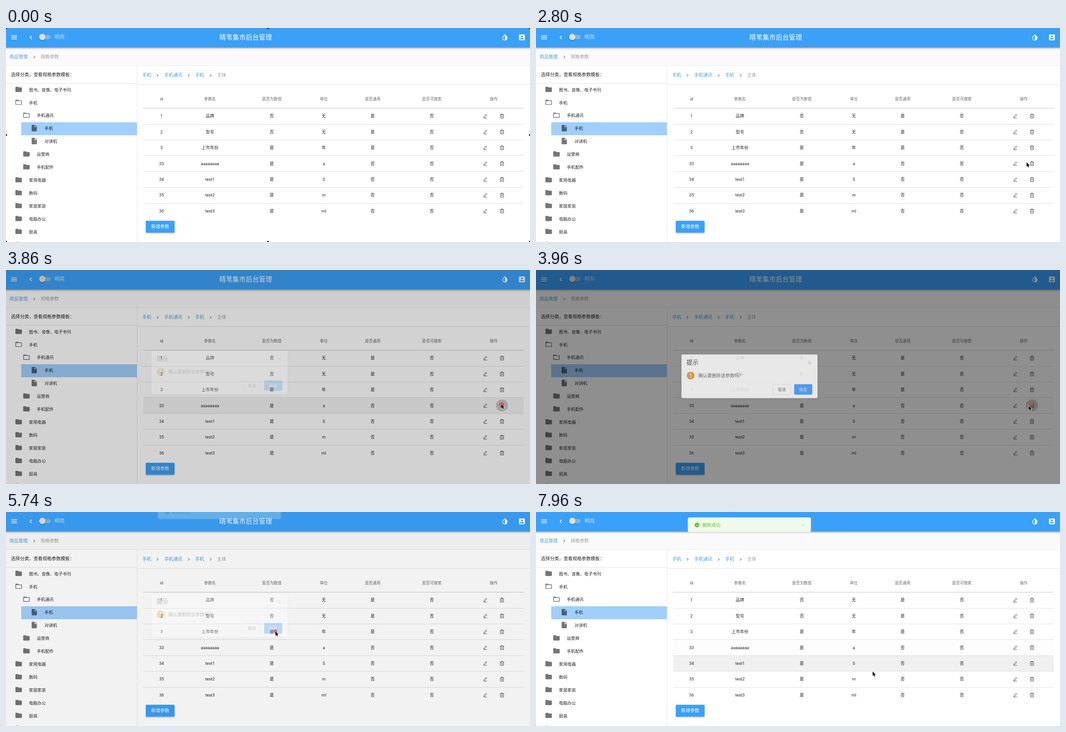
Recreate the animation shown at these times as an HTML page with a canvas. Size 1169 px wide and 479 px high, loop 8000 ms.

```html
<!DOCTYPE html>
<html lang="zh-CN">
<head>
<meta charset="utf-8">
<style>
html, body { margin: 0; width: 100%; height: 100%; overflow: hidden; background: #fff; }
canvas { display: block; width: 1169px; height: 479px; }
</style>
</head>
<body>
<canvas id="stage"></canvas>
<script>
const W = 1169, H = 479, LOOP = 8000, TAU = Math.PI * 2;
const dpr = window.devicePixelRatio || 1;

function setup(canvas) {
  canvas.width = Math.round(W * dpr);
  canvas.height = Math.round(H * dpr);
  const c = canvas.getContext('2d');
  c.scale(dpr, dpr);
  return c;
}
const screen2d = setup(document.getElementById('stage'));
const layer2d = setup(document.createElement('canvas'));
let ctx = screen2d;

// The interface is laid out at this zoom level.
const ZOOM = 0.722;
const BLUE = '#3ba0f8', LINK = '#4a9fe0', GREY = '#757575', DARK = 'rgba(0,0,0,.87)';
const FONT = 'Roboto, "Noto Sans CJK SC", "Noto Sans CJK", sans-serif';

const ICONS = {
  folder: 'M10 4H4c-1.1 0-1.99.9-1.99 2L2 18c0 1.1.9 2 2 2h16c1.1 0 2-.9 2-2V8c0-1.1-.9-2-2-2h-8l-2-2z',
  open: 'M20 6h-8l-2-2H4c-1.1 0-1.99.9-1.99 2L2 18c0 1.1.9 2 2 2h16c1.1 0 2-.9 2-2V8c0-1.1-.9-2-2-2zm0 12H4V8h16v10z',
  file: 'M6 2c-1.1 0-1.99.9-1.99 2L4 20c0 1.1.89 2 1.99 2H18c1.1 0 2-.9 2-2V8l-6-6H6zm7 7V3.5L18.5 9H13z',
  menu: 'M3 18h18v-2H3v2zm0-5h18v-2H3v2zm0-7v2h18V6H3z',
  left: 'M15.41 7.41L14 6l-6 6 6 6 1.41-1.41L10.83 12z',
  right: 'M10 6L8.59 7.41 13.17 12l-4.58 4.59L10 18l6-6z',
  invert: 'M17.66 7.93L12 2.27 6.34 7.93c-3.12 3.12-3.12 8.19 0 11.31C7.9 20.8 9.95 21.58 12 21.58c2.05 0 4.1-.78 5.66-2.34 3.12-3.12 3.12-8.19 0-11.31zM12 19.59c-1.6 0-3.11-.62-4.24-1.76C6.62 16.69 6 15.19 6 13.59s.62-3.11 1.76-4.24L12 5.1v14.49z',
  account: 'M3 5v14c0 1.1.89 2 2 2h14c1.1 0 2-.9 2-2V5c0-1.1-.9-2-2-2H5c-1.11 0-2 .9-2 2zm12 4c0 1.66-1.34 3-3 3s-3-1.34-3-3 1.34-3 3-3 3 1.34 3 3zm-9 8c0-2 4-3.1 6-3.1s6 1.1 6 3.1v1H6v-1z'
};
for (const k in ICONS) ICONS[k] = new Path2D(ICONS[k]);

const PEN = new Path2D('M-3.2 3.2L-2.6 .8L2 -4.2L3.8 -2.6L-.8 2.5ZM-3.6 4.5H4.2');
const TRASH = new Path2D('M-4.5 -3H4.5M-1.6 -3V-4.6H1.6V-3M-3.5 -3V4.6H3.5V-3M-1.2 -.8V2.6M1.2 -.8V2.6');
const ARROW = new Path2D('M0 0V9.8L2.2 7.8L3.8 11.5L5.5 10.8L3.9 7.2H7Z');
const HAND = new Path2D('M-1.9 .4Q-.9 -.6 0 .4V4.4L3.8 5.2Q5 5.6 4.9 7L4.2 10.8H-1.6L-4.6 6.6Q-4.6 5.2 -3.4 5.5L-1.9 6.8Z');

const TREE = [
  ['folder', 0, '图书、音像、电子书刊'], ['open', 0, '手机'], ['open', 1, '手机通讯'],
  ['file', 2, '手机'], ['file', 2, '对讲机'], ['folder', 1, '运营商'], ['folder', 1, '手机配件'],
  ['folder', 0, '家用电器'], ['folder', 0, '数码'], ['folder', 0, '家居家装'],
  ['folder', 0, '电脑办公'], ['folder', 0, '厨具'], ['folder', 0, '']
];
const COLS = [347, 455, 593, 709, 818, 950, 1088];
const HEAD = ['id', '参数名', '是否为数值', '单位', '是否通用', '是否可搜索', '操作'];
const ROWS = [
  ['1', '品牌', '否', '无', '是', '否'], ['2', '型号', '否', '无', '是', '否'],
  ['3', '上市年份', '是', '年', '是', '否'], ['33', 'aaaaaaaa', '是', 'a', '否', '否'],
  ['34', 'test1', '是', 'S', '否', '否'], ['35', 'test2', '是', 'm', '否', '否'],
  ['36', 'test3', '是', 'ml', '否', '否']
];
const ROW_TOP = 179.6, ROW_H = 35.4;

// Pointer path: time, x, y
const PATH = [
  [460, 618, 432], [640, 1051, 323], [1200, 1053, 324], [1480, 1129, 375], [1640, 1129, 375],
  [1740, 1122, 371], [1980, 1120, 356], [2140, 1119, 355], [2540, 1106, 328], [2940, 1090, 290],
  [2980, 1090, 290], [3500, 1105, 300], [3860, 1105, 300], [3960, 1099, 304], [4320, 616, 277],
  [4660, 616, 277], [5000, 601, 267], [6920, 601, 267], [7720, 735, 318], [7960, 751, 357]
];
const CLICKS = [
  { down: 3560, up: 3710, x: 1105.5, y: 301 },
  { down: 5200, up: 5550, x: 601, y: 267 }
];
const DIALOG_IN = 3813, DIALOG_OUT = 5620, TOAST_IN = 5715;

const clamp = v => Math.max(0, Math.min(1, v));

// cubic-bezier(.25, .1, .25, 1)
function ease(p) {
  if (p <= 0) return 0;
  if (p >= 1) return 1;
  let lo = 0, hi = 1, s = p;
  for (let i = 0; i < 18; i++) {
    s = (lo + hi) / 2;
    const x = 0.75 * s * (1 - s) + s ** 3;
    if (x < p) lo = s; else hi = s;
  }
  return 0.3 * s * (1 - s) ** 2 + 3 * s * s * (1 - s) + s ** 3;
}
const fade = (t, start, end, ms = 300) => ease((t - start) / ms) * (1 - ease((t - end) / ms));

function text(s, x, cy, px, color, align = 'left', weight = 400) {
  const size = px * ZOOM;
  ctx.font = `${weight} ${size}px ${FONT}`;
  ctx.textAlign = align;
  ctx.fillStyle = color;
  ctx.fillText(s, x, cy + size * 0.37);
}
function rect(x, y, w, h, color) {
  ctx.fillStyle = color;
  ctx.fillRect(x, y, w, h);
}
function box(x, y, w, h, r, fill, stroke) {
  ctx.beginPath();
  ctx.roundRect(x, y, w, h, r);
  ctx.fillStyle = fill;
  ctx.fill();
  if (stroke) line(stroke);
}
function line(color, width = 0.8) {
  ctx.strokeStyle = color;
  ctx.lineWidth = width;
  ctx.stroke();
}
function dot(x, y, r, color) {
  ctx.beginPath();
  ctx.arc(x, y, r, 0, TAU);
  ctx.fillStyle = color;
  ctx.fill();
}
function icon(name, cx, cy, color, px = 24) {
  const k = px * ZOOM / 24;
  ctx.save();
  ctx.translate(cx - 12 * k, cy - 12 * k);
  ctx.scale(k, k);
  ctx.fillStyle = color;
  ctx.fill(ICONS[name]);
  ctx.restore();
}
function shape(path, x, y, stroke, width, fill) {
  ctx.save();
  ctx.translate(x, y);
  ctx.strokeStyle = stroke;
  ctx.lineWidth = width;
  ctx.lineJoin = 'round';
  ctx.stroke(path);
  if (fill) {
    ctx.fillStyle = fill;
    ctx.fill(path);
  }
  ctx.restore();
}
function cross(x, y, r, color) {
  ctx.beginPath();
  ctx.moveTo(x - r, y - r); ctx.lineTo(x + r, y + r);
  ctx.moveTo(x + r, y - r); ctx.lineTo(x - r, y + r);
  line(color);
}
function shadow(alpha, blur, dy, draw) {
  ctx.save();
  ctx.shadowColor = `rgba(0,0,0,${alpha})`;
  ctx.shadowBlur = blur * dpr;
  ctx.shadowOffsetY = dy * dpr;
  draw();
  ctx.restore();
}

// Draws on a spare canvas first, so that a group fades as one piece.
function group(alpha, dy, draw) {
  if (alpha <= 0) return;
  layer2d.clearRect(0, 0, W, H);
  ctx = layer2d;
  draw();
  ctx = screen2d;
  ctx.globalAlpha = alpha;
  ctx.drawImage(layer2d.canvas, 0, dy, W, H);
  ctx.globalAlpha = 1;
}

function drawHeader() {
  shadow(0.4, 4, 1.5, () => rect(-10, -10, W + 20, 53.6, BLUE));
  icon('menu', 18, 21, '#fff');
  icon('left', 55.5, 21, '#fff');
  box(76, 15.5, 23.5, 9.6, 4.8, '#8bb3d8');
  shadow(0.35, 3, 1, () => dot(81, 20, 7.2, '#dedede'));
  text('明亮', 108, 20, 16, 'rgba(255,255,255,.7)');
  ctx.letterSpacing = '0.29px';
  text('晴苇集市后台管理', 476, 21, 20, '#fff', 'left', 500);
  ctx.letterSpacing = '0px';
  icon('invert', 1113, 21, '#fff');
  icon('account', 1151, 21, '#fff');
}

function drawTree() {
  rect(0, 85, 292, H - 85, '#fff');
  text('选择分类，查看规格参数模板：', 11, 104, 14, DARK);
  rect(0, 123.5, 292, 1, '#e0e0e0');
  rect(34, 211, 258, 29, '#a0cffc');
  TREE.forEach(([kind, level, label], i) => {
    const y = 138.2 + i * 28.9, x = level * 17.4;
    icon(kind, 28.2 + x, y - 0.8, 'rgba(0,0,0,.54)');
    text(label, 51.3 + x, y, 13, DARK);
  });
}

function drawTable(t) {
  rect(293, 85, W - 293, H - 85, '#fff');
  rect(292, 85, 1, H - 85, '#e6e6e6');
  [['手机', 304], ['手机通讯', 353], ['手机', 422]].forEach(([s, x]) => text(s, x, 105.5, 14, LINK));
  text('主体', 471, 105.5, 14, '#9e9e9e');
  [338, 407.5, 456.5].forEach(x => icon('right', x, 106, GREY, 18));
  rect(294, 126, W - 294, 1, '#e2e2e2');

  const hover = {
    2: fade(t, 5860, 7260),
    3: Math.max(fade(t, 3000, 3800), fade(t, 7260, 7790)),
    4: fade(t, 7790, LOOP)
  };
  HEAD.forEach((s, i) => text(s, COLS[i], 158.8, 12, 'rgba(0,0,0,.6)', 'center', 500));
  ROWS.forEach((row, i) => {
    const top = ROW_TOP + i * ROW_H, cy = 197 + i * ROW_H;
    if (hover[i]) rect(306, top + 0.4, 849, ROW_H, `rgba(0,0,0,${0.067 * hover[i]})`);
    row.forEach((s, c) => text(s, COLS[c], cy, 13, DARK, 'center'));
    shape(PEN, 1069, cy + 0.2, '#444', 0.9);
    shape(TRASH, 1106.5, cy + 0.2, '#444', 0.9);
    rect(306, Math.round(top - 0.5), 849, 1, i ? '#e0e0e0' : '#c4c4c4');
  });
  const ring = fade(t, 3100, 4000);
  if (ring) dot(1106.5, 303, 13.3, `rgba(0,0,0,${0.19 * ring})`);

  shadow(0.3, 3, 1.4, () => box(312, 431.5, 64, 26.5, 1.5, BLUE));
  text('新增参数', 344, 444.5, 14, '#fff', 'center', 500);
}

function drawPage(t) {
  rect(0, 0, W, H, '#fafafa');
  text('商品管理', 8, 64.5, 14, LINK);
  icon('right', 63, 65, GREY, 18);
  text('规格参数', 77.5, 64.5, 14, '#9e9e9e');
  drawTree();
  drawTable(t);
  rect(0, 84, W, 1, '#ececec');
  drawHeader();
}

function drawDialog() {
  shadow(0.1, 9, 1.5, () => box(324.5, 192, 303.5, 97.8, 3, '#fff'));
  text('提示', 336, 209.5, 18, '#303133');
  cross(610.3, 211, 3.3, '#909399');
  dot(345, 239.2, 8.8, '#e6a23c');
  box(344.1, 233.8, 1.8, 6.6, 0.9, '#fff');
  dot(345, 243, 1.1, '#fff');
  text('确认要删除该参数吗?', 362, 239.3, 14, '#606266');
  box(528.4, 258.9, 40, 22.8, 2, '#fff', '#dcdfe6');
  text('取消', 548.4, 270.3, 12, '#606266', 'center', 500);
  box(576, 258.6, 40.3, 23.4, 2, '#409eff');
  text('确定', 596, 270.3, 12, '#fff', 'center', 500);
}

function drawToast() {
  box(339, 12.4, 274, 32.6, 3, '#f0f9eb', '#e1f3d8');
  dot(359, 29, 5.3, '#67c23a');
  ctx.beginPath();
  ctx.moveTo(356.6, 29.1);
  ctx.lineTo(358.4, 30.9);
  ctx.lineTo(361.6, 27.3);
  line('#fff', 1);
  text('删除成功', 371, 29, 14, '#67c23a');
  cross(596, 29, 3.2, '#c0c4cc');
}

function drawClick(t, { down, up, x, y }) {
  if (t < down) return;
  const r = t < up ? 11 * clamp((t - down) / 150) : 11 * Math.exp((up - t) / 200);
  if (r > 0.6) dot(x, y, r, 'rgba(236,68,76,.85)');
}

function drawPointer(t) {
  if (t < PATH[0][0]) return;
  let i = 0;
  while (i < PATH.length - 2 && t >= PATH[i + 1][0]) i++;
  const [t0, x0, y0] = PATH[i], [t1, x1, y1] = PATH[i + 1];
  const p = clamp((t - t0) / (t1 - t0)), s = p * p * (3 - 2 * p);
  const x = x0 + (x1 - x0) * s, y = y0 + (y1 - y0) * s;
  const onButton = t > DIALOG_IN && t < DIALOG_OUT && x > 576 && x < 616.5 && y > 258 && y < 282;
  shape(onButton ? HAND : ARROW, x, y, '#fff', 1.4, '#000');
  if (onButton) shape(HAND, x, y, '#000', 1, '#fff');
}

// Small grips at the corners and edge middles of the recorded area
function drawGrips() {
  for (const x of [0, W / 2, W])
    for (const y of [0, H / 2, H])
      if (x !== W / 2 || y !== H / 2) dot(x, y, 2.4, '#222');
}

function render(t) {
  drawPage(t);
  const dim = 0.46 * fade(t, DIALOG_IN, DIALOG_OUT, 200);
  if (dim) rect(0, 0, W, H, `rgba(0,0,0,${dim})`);
  const shown = fade(t, DIALOG_IN, DIALOG_OUT);
  group(shown, -20 * ZOOM * (1 - shown), drawDialog);
  const slide = ease((t - TOAST_IN) / 245);
  group(ease((t - TOAST_IN) / 150), -33 * (1 - slide), drawToast);
  CLICKS.forEach(c => drawClick(t, c));
  drawPointer(t);
  if (t < 60) drawGrips();
}

const start = performance.now();
function tick() {
  render((performance.now() - start) % LOOP);
  requestAnimationFrame(tick);
}
tick();
</script>
</body>
</html>
```
